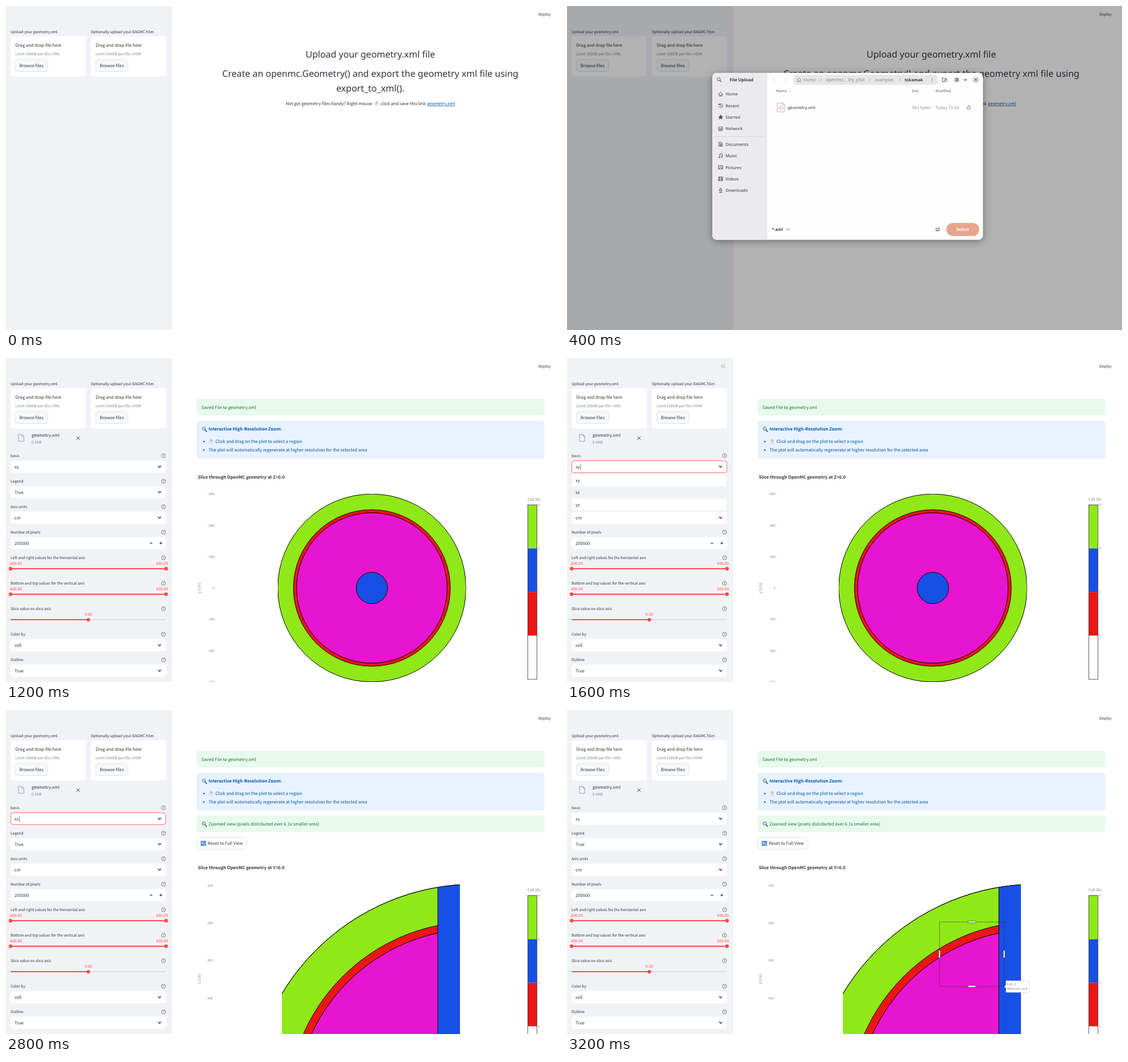
Animation, 978 px wide and 572 px high, one loop 3.6 s. Source, as an HTML page:

```html
<!DOCTYPE html>
<html lang="en">
<head>
<meta charset="utf-8">
<title>Geometry plotter</title>
<style>
html, body { margin: 0; width: 100%; height: 100%; overflow: hidden; background: #fff; }
svg { display: block; }
text { font-family: "Noto Sans CJK JP", "Noto Sans CJK SC", "Noto Sans CJK", sans-serif; font-size: 7.63px; fill: #31333f; text-rendering: geometricPrecision; white-space: pre; }
.s { font-size: 6.68px; }
.xs { font-size: 5.73px; }
.b { font-weight: 700; }
.mid { text-anchor: middle; }
.end { text-anchor: end; }
.grey { fill: #83858f; }
.red { fill: #ff4b4b; }
.blue { fill: #0054a3; }
.green { fill: #177233; }
.h { font: 16px "Noto Sans", "Open Sans", sans-serif; text-anchor: middle; }
.d { font: 7.5px "Noto Sans", "Open Sans", sans-serif; fill: #38383b; }
.d.b { font-weight: 700; }
.d.dim { fill: #8e8e91; }
.d.path { fill: #858588; font-weight: 500; }
.d.head { font-size: 6.2px; fill: #8e8e91; }
</style>
</head>
<body>
<svg id="stage" width="978" height="572" viewBox="0 0 978 572"></svg>
<script>
const text = (x, y, str, cls = "", extra = "") => `<text x="${x}" y="${y}" class="${cls}" ${extra}>${str}</text>`;
const rect = (x, y, x2, y2, fill, r = 0, stroke = "none", extra = "") =>
  `<rect x="${x}" y="${y}" width="${x2 - x}" height="${y2 - y}" rx="${r}" fill="${fill}" stroke="${stroke}" ${extra}/>`;
const circle = (x, y, r, fill, stroke = "none", w = 1) =>
  `<circle cx="${x}" cy="${y}" r="${r}" fill="${fill}" stroke="${stroke}" stroke-width="${w}"/>`;
const line = (d, color = "#31333f", w = 1, fill = "none") =>
  `<path d="${d}" fill="${fill}" stroke="${color}" stroke-width="${w}" stroke-linecap="round" stroke-linejoin="round"/>`;
const at = (x, y, body) => `<g transform="translate(${x} ${y})">${body}</g>`;
const chevron = (x, y, w = 1.3, color = "#31333f") => line(`M${x - 2.3} ${y - 1.1}l2.3 2.3l2.3 -2.3`, color, w);

const GREEN = "#90e818", RED = "#eb1616", PINK = "#e815d0", BLUE = "#1850e6";
const ROW = 45.03;
const rowY = i => 172.3 + ROW * i;

const mouseIcon = (x, y) => at(x, y,
  rect(-2.4, -3.5, 2.4, 3.6, "#eceff1", 2.3, "#a9b0b4", 'stroke-width=".6"') +
  line("M-2.3 -.5H2.3M0 -3.4V-.5", "#a9b0b4", .5) + rect(-.6, -2.6, .6, -.9, "#546e7a", .5));
const lens = (x, y) => at(x, y,
  line("M1.2 1.2L4 4.2", "#455560", 1.7) + circle(-1, -1, 2.9, "#b9dcf5", "#5a6f7c", .9));

// Sidebar with uploads
function upload(x, label, kind) {
  return text(x, 47.6, label, "s") + rect(x, 53.6, x + 132.8, 124.5, "#fff", 4.3) +
    text(x + 8.6, 72, "Drag and drop file here") +
    text(x + 8.6, 86.5, `Limit 100GB per file • ${kind}`, "s grey") +
    rect(x + 8.8, 94.6, x + 65.4, 115.5, "#f7fafb", 4.2, "#cfd5d9", 'stroke-width=".7"') +
    text(x + 37.1, 107.9, "Browse files", "mid");
}
const base = rect(0, 0, 978, 572, "#fff") + rect(0, 0, 292.7, 572, "#f0f2f6") +
  upload(8, "Upload your geometry.xml", "XML") +
  upload(149.4, "Optionally upload your DAGMC h5m", "H5M") + text(938, 16.7, "Deploy", "s");

const intro = text(642, 91, "Upload your geometry.xml file", "h") +
  text(642, 125.2, "Create an openmc.Geometry() and export the geometry xml file using", "h") +
  text(642, 151, "export_to_xml().", "h") +
  text(493, 175.2, "Not got geometry files handy? Right mouse") + mouseIcon(653.2, 172.3) +
  text(660.3, 175.2, "click and save this link") +
  text(742, 175.2, "geometry.xml", "blue", 'text-decoration="underline"');

// File dialog
const INK = "#4a4a4d";
const placeIcons = [
  "M-3.5 0L0 -3.5L3.5 0M-2.6 -.6V3.4H2.6V-.6M0 3.2V1",
  "M-3 -1.8A3.5 3.5 0 1 1 -3.3 1.4M-3.5 -3.4V-1.4H-1.5M0 -2V.3L1.6 1.4",
  "M0 -3.6L1.1 -1.1L3.7 -.9L1.7 .8L2.3 3.4L0 2L-2.3 3.4L-1.7 .8L-3.7 -.9L-1.1 -1.1Z",
  "M-3.3 -3H3.3V1.6H-3.3ZM-3.5 3.4H3.5M-2 0H2",
  "M-2.7 -3.5H1L2.8 -1.7V3.5H-2.7ZM-1.3 -1H1.3M-1.3 .6H1.3M-1.3 2.1H1.3",
  "M-1.6 2.3V-3.1L2.9 -3.5V1.8M-1.6 2.4a1 1 0 1 1 -1.2 -.7M2.9 1.8a1 1 0 1 1 -1.2 -.7",
  "M-3.6 -3H3.6V3H-3.6ZM-2.8 2.2L-.8 -.5L.8 1.2L1.8 .4L3 2.2M1.5 -1.5h.2",
  "M-3.3 -3.2H3.3V3.2H-3.3ZM-1.9 -3.2V3.2M1.9 -3.2V3.2M-1.9 0H1.9",
  "M-1.2 -3.5H1.2V0H2.9L0 2.6L-2.9 0H-1.2ZM-2.4 3.8H2.4"];
const places = ["Home", "Recent", "Starred", "Network", "Documents", "Music", "Pictures", "Videos", "Downloads"];
const placeList = places.map((name, i) => {
  const y = 155.5 + 20.35 * i + (i > 3 ? 7.2 : 0);
  return at(270.8, y, line(placeIcons[i], INK, .9, i === 2 ? INK : "none")) + text(279.3, y + 2.7, name, "d");
}).join("");

const dialogBase = rect(0, 0, 978, 572, "#000", 0, "none", 'opacity=".3"') +
  rect(256, 118, 733, 412.8, "#fefefe", 8, "none", 'style="filter:drop-shadow(0 3px 7px rgba(0,0,0,.36))"') +
  `<path d="M352 118H264a8 8 0 0 0 -8 8V404.8a8 8 0 0 0 8 8H352Z" fill="#ebebed"/>` +
  line("M352.2 118V412.8", "#dedee0", .6) + line("M259 230.6H349", "#d0d0d3", .7) +
  at(268, 130, circle(-.6, -.6, 2.7, "none", INK) + line("M1.5 1.5L3.6 3.6", INK, 1.2)) +
  text(307.6, 132.8, "File Upload", "d b mid") + placeList +
  line("M365.6 127.5L362.9 130.2L365.6 132.9M385 127.5L387.7 130.2L385 132.9", "#d6d6d8", 1) +
  rect(398.5, 121.4, 653, 139.2, "#e7e7e9", 6) + at(409, 130.3, line(placeIcons[0], "#858588", .9)) +
  text(417, 132.8, "Home", "d path") + text(446.2, 133, "/", "d dim") +
  text(456, 132.8, "openmc... try_plot", "d path", 'style="font-size:8.1px"') + text(532.2, 133, "/", "d dim") +
  text(542.6, 132.8, "examples", "d path") + text(585, 133, "/", "d dim") +
  text(595, 132.8, "tokamak", "d b", 'style="font-size:7.2px"') +
  [127.6, 130.2, 132.8].map(y => circle(643.5, y, .65, INK)).join("") +
  at(665.3, 130.3, line("M-.8 3.3H-3.8V-3.3H-.8L.3 -2.1H3.8V0", INK, .9) + circle(1.3, 1.2, 1.7, "none", INK, .9) + line("M2.7 2.6L4 3.9", INK)) +
  at(687, 130.3, [-3, .6].map(x => [-3, .6].map(y => rect(x, y, x + 2.4, y + 2.4, "none", .3, INK, 'stroke-width=".9"')).join("")).join("")) +
  chevron(702, 130.3, 1.1, INK) + circle(720.3, 130.2, 6.5, "#e3e3e5") + line("M718.4 128.3l3.8 3.8m0 -3.8l-3.8 3.8", INK, 1.1) +
  text(368.3, 152, "Name", "d b head") + line("M391 151L393.2 148.8L395.4 151", "#c9c9cb", .8) +
  text(608, 152, "Size", "d b head") + text(649.3, 152, "Modified", "d b head");

const fileRow = line("M371.7 171.2H380.2L383.7 174.7V186Q383.7 187 382.7 187H371.2Q370.2 187 370.2 186V172.7Q370.2 171.2 371.7 171.2Z", "#a5a5a8", .7, "#f8f7f8") +
  line("M380.2 171.2V174.7H383.7", "#a5a5a8", .6) +
  line("M374.3 178.1L372.2 180.2L374.3 182.3M379.7 178.1L381.8 180.2L379.7 182.3M377.8 177.5L376.2 182.9", "#ef6d8b", .8) +
  text(388.7, 181.7, "geometry.xml", "d") + text(608, 181.7, "561 bytes", "d dim") + text(649, 181.7, "Today 15:54", "d dim") +
  at(707.8, 179.2, line(placeIcons[2], "#77777a", .8)) +
  text(361, 397, "*.xml", "d b", 'style="font-size:7.2px"') + chevron(389.9, 394.5, 1, INK) +
  line("M649.3 392.7H654M649.3 396.3H650.5M653.5 396.3H657", INK, .9) +
  circle(655.5, 392.7, 1.2, "none", INK, .9) + circle(652, 396.3, 1.2, "none", INK, .9);
const selectButton = color => rect(668.5, 382.9, 726.4, 406, color, 11.5) +
  text(697.3, 397.1, "Select", "d b mid", 'style="fill:#fff"');
const picked = rect(365, 167, 720, 191, "#e3e3e3", 5.5);
const pill = rect(589, 359, 731, 374.3, "#e8e8ea", 6.5) + text(595, 369.4, '"geometry.xml" selected\u00a0 (561 bytes)', "d");

// Plot options
const fieldLabels = ["basis", "Legend", "Axis units", "Number of pixels", "Left and right values for the horizontal axis",
  "Bottom and top values for the vertical axis", "Slice value on slice axis", "Color by", "Outline"];
const fieldValues = { 0: "", 1: "True", 2: "cm", 3: "200000", 7: "cell", 8: "True" };
const fields = fieldLabels.map((label, i) => {
  const y = rowY(i), mid = y + 19.5;
  let out = text(8, y + 2.6, label, "s") + circle(277.6, y + .2, 3.6, "none", "#5c5f6b", .75) + text(277.6, y + 2.2, "?", "xs mid");
  if (i in fieldValues) {
    out += rect(8, mid - 10.7, 282, mid + 10.7, "#fff", 4.2) + text(15, mid + 2.8, fieldValues[i]);
    out += i === 3 ? line(`M253.7 ${mid}h3.6M271 ${mid}h3.6m-1.8 -1.8v3.6`, "#31333f", 1.2) : chevron(270.6, mid);
  }
  return out;
}).join("");
function slider(i, from, to, labels) {
  const y = rowY(i) + 19.6;
  return rect(8, y - 1, 282, y + 1, "#d8dce6", 1) + rect(from, y - 1, to, y + 1, "#ff4b4b", 1) +
    labels.map(([x, tx, v]) => circle(x, y, 3.2, "#ff4b4b") + text(tx, y - 6.7, v, "s red mid")).join("");
}
const ends = [[8, 16.5, "-600.00"], [282, 275, "600.00"]];
const options = line("M23.4 135.3H28.6L31.4 138.1V147H22V135.3Z", "#8c9fc6", 1) + line("M28.4 135.5V138.3H31.2", "#8c9fc6", .8) +
  text(45, 138.9, "geometry.xml") + text(45, 150.6, "0.6KB", "s grey") +
  line("M124.5 138.9l5 5m0 -5l-5 5", "#31333f", 1) + fields +
  slider(4, 8, 282, ends) + slider(5, 8, 282, ends) + slider(6, 8, 145.2, [[145.2, 145.2, "0.00"]]);
const basis = v => text(15, 194.6, v);
const focus = rect(8.3, 181.4, 281.7, 202.3, "none", 4, "#ff4b4b", 'stroke-width=".8"') + line("M23.8 187V197", "#31333f", .6);
const menu = rect(8, 204.5, 282, 269.5, "#fff", 4.2, "#e2e4ea", 'stroke-width=".6"') +
  rect(8.4, 226.2, 281.6, 247.8, "#f0f2f6") +
  ["xy", "xz", "yz"].map((v, i) => text(15, 218.5 + 21.6 * i, v)).join("") +
  line("M274.6 11.5L271.6 14.5L274.6 17.5M278.4 11.5L275.4 14.5L278.4 17.5", "#80828c", .9);

// Messages
const messages = rect(336, 72, 948.5, 101.5, "#e8f9ee", 4.2) + text(344.5, 89.6, "Saved File to geometry.xml", "green") +
  rect(336, 110.8, 948.5, 177.8, "#e8f2ff", 4.2) + lens(349.5, 125.6) +
  text(357, 128.2, "Interactive High-Resolution Zoom:", "b blue") +
  circle(348.6, 147.6, 1.3, "#0054a3") + circle(348.6, 162.6, 1.3, "#0054a3") + mouseIcon(361.6, 147.2) +
  text(369, 150.1, "Click and drag on the plot to select a region", "blue") +
  text(357, 165.1, "The plot will automatically regenerate at higher resolution for the selected area", "blue");
const zoomMessages = rect(336, 186.3, 948.5, 215.8, "#e8f9ee", 4.2) + lens(349.5, 201.3) +
  text(357, 203.9, "Zoomed view (pixels distributed over 6.1x smaller area)", "green") +
  rect(336, 225, 424.3, 245.8, "#fff", 4.2, "#d3d5da", 'stroke-width=".7"') +
  rect(343.2, 231, 352.6, 240, "#4a90d9", 1.2) + line("M347 233L345 235L347 237M345.2 235H349.2a1.5 1.5 0 0 1 0 3H348", "#fff", .9) +
  text(355.5, 238, "Reset to Full View");

// Plot parts
const title = (y, axis) => text(338, y, `Slice through OpenMC geometry at ${axis}=0.0`, "b");
const axisName = (y, name) => text(0, 0, `${name} [cm]`, "s grey mid", `transform="translate(343.3 ${y}) rotate(-90)"`);
const tick = (x, y, v) => text(x, y + 2.1, v, "xs grey end") + line(`M${x + 2} ${y}h1.6`, "#e0e4ea", .6);
const colorBar = y => text(919, y - 7.2, "Cell IDs", "s grey") +
  [GREEN, BLUE, RED, "#fff"].map((c, i) => rect(919.5, y + 77 * i, 935.7, y + 77 * (i + 1), c) +
    text(937.3, y + 77 * i + 2.1, 4 - i, "xs grey")).join("") +
  rect(919.5, y, 935.7, y + 308, "none", 0, "#333", 'stroke-width=".8"');
const rings = (x, y, k) => [[600, GREEN], [500, RED], [480, PINK]].map(([r, c]) => circle(x, y, r * k, c, "#000")).join("");
const column = (x, y, k, id) => `<clipPath id="${id}"><circle cx="${x}" cy="${y}" r="${600 * k}"/></clipPath>
  <g clip-path="url(#${id})">${rect(x - 100 * k, y - 601 * k, x + 100 * k, y + 601 * k, BLUE, 0, "#000")}</g>` +
  circle(x, y, 600 * k, "none", "#000");
const clipped = (id, x, y, x2, y2, body) =>
  `<clipPath id="${id}">${rect(x, y, x2, y2, "#000")}</clipPath><g clip-path="url(#${id})">${body}</g>`;

const CX = 644.7, CY = 406, K = .2764;
const fullAxes = [-600, -400, -200, 0, 200, 400, 600].map(v => tick(367.2, CY + v * K, String(v).replace("-", "−"))).join("") + colorBar(259.2);
const frameBox = [479, 239.9, 810.6, 572];
const planView = title(212.9, "Z") + axisName(CY, "y") +
  clipped("plan", ...frameBox, rings(CX, CY, K) + circle(CX, CY, 100 * K, BLUE, "#000"));
const sideView = title(212.9, "Y") + axisName(CY, "z") +
  clipped("side", ...frameBox, rings(CX, CY, K) + column(CX, CY, K, "sideDisc"));
const dashed = (x, y, x2, y2, w) => rect(x, y, x2, y2, "none", 0, "#333", `stroke-width="${w}" stroke-dasharray="2 1.4"`);
const drag = dashed(503.4, 251.4, 634.8, 378.6, .8);

const ZX = 827.2, ZY = 704.6, ZK = .662;
const zoomView = title(281.4, "Y") + axisName(474.5, "z") + colorBar(327.6) +
  [100, 200, 300, 400].map((v, i) => tick(364.2, 309.8 + 66.2 * i, v)).join("") +
  clipped("zoom", 486.2, 308, 799.8, 572, rings(ZX, ZY, ZK) + column(ZX, ZY, ZK, "zoomDisc"));
const handle = (x, y, w, h) => rect(x - w, y - h, x + w, y + h, "#fff", .3, "#444", 'stroke-width=".7"');
const zoomDrag = dashed(656.4, 374.2, 770.4, 488, .9) +
  handle(713.5, 374.2, 6.6, 1.4) + handle(713.5, 488, 6.6, 1.4) + handle(656.4, 431, 1.4, 6.6) + handle(770.4, 431, 1.4, 6.6) +
  line("M770.8 488.2L773.6 485.4V478H814.4V498.6H773.6V491Z", "#c6cad6", .6, "#fff") +
  text(775.3, 486.4, "Cell: 2", "xs grey") + text(775.3, 494.3, "Material: void", "xs grey");

// Each layer: drawing, first step, last step
const layers = [
  [base, 0, 8], [intro, 0, 2], [dialogBase, 1, 2], [picked, 2, 2], [fileRow, 1, 2],
  [selectButton("#eaa48e"), 1, 1], [selectButton("#d4430f") + pill, 2, 2],
  [options, 3, 8], [basis("xy"), 3, 4], [basis("xz"), 5, 8], [focus, 4, 7], [menu, 4, 4],
  [messages, 3, 8], [fullAxes, 3, 6], [planView, 3, 4], [sideView, 5, 6], [drag, 6, 6],
  [zoomMessages + zoomView, 7, 8], [zoomDrag, 8, 8]];
const STEP = 400, LOOP = 3600;
const stage = document.getElementById("stage");
stage.innerHTML = layers.map(([body]) => `<g>${body}</g>`).join("");
const groups = [...stage.children];
let shown = -1;
function show(now) {
  const step = Math.floor((now % LOOP) / STEP);
  if (step !== shown) {
    shown = step;
    layers.forEach(([, from, to], i) => { groups[i].style.display = step >= from && step <= to ? "" : "none"; });
  }
}
const start = performance.now();
function loop() {
  show(performance.now() - start);
  requestAnimationFrame(loop);
}
loop();
</script>
</body>
</html>
```
